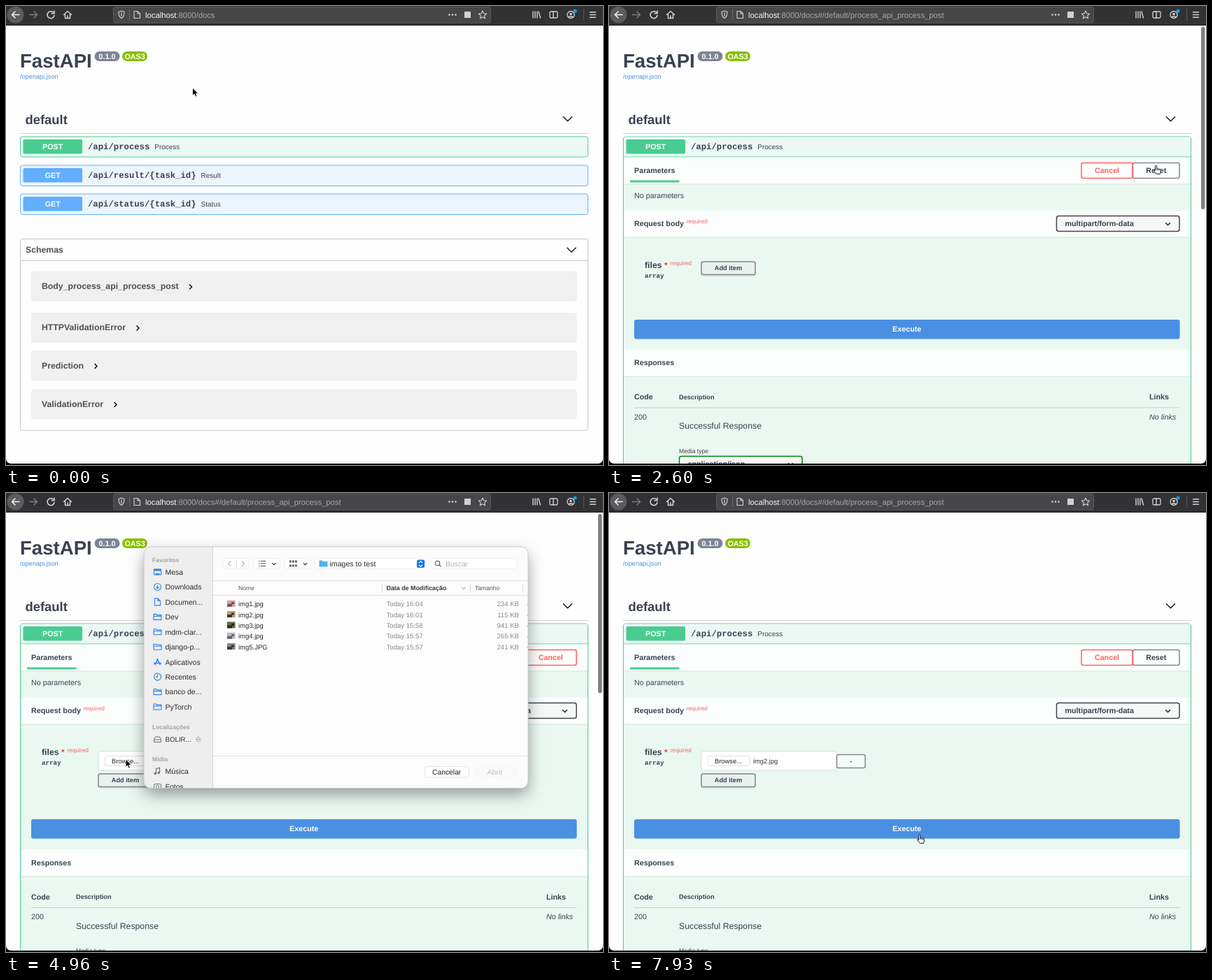
Recreate the animation shown at these times as an HTML page. Size 853 by 657 pixels, loop 8000 ms.

```html
<!DOCTYPE html>
<html lang="en">
<head>
<meta charset="utf-8">
<title>API docs upload</title>
<style>
html, body { margin: 0; width: 100%; height: 100%; overflow: hidden; background: #000; }
svg { display: block; width: 853px; height: 657px; }
text { font-family: "Liberation Sans", Arial, sans-serif; text-rendering: geometricPrecision; white-space: pre; }
.mono { font-family: "Liberation Mono", "Courier New", monospace; }
</style>
</head>
<body>
<svg id="stage" viewBox="0 0 853 657" xmlns="http://www.w3.org/2000/svg"></svg>
<script>
const INK = '#3b4151', GREEN = '#49cc90', BLUE = '#61affe', RED = '#ff6060';
const TINT = '#e9f8f1', BOLD = 'font-weight="700"', MID = 'text-anchor="middle"';
const ICON = '#d2d2d4', MAC = '#2583f0';

const text = (x, y, s, size = 10.74, fill = INK, extra = '') =>
  `<text x="${x}" y="${y}" font-size="${size}" fill="${fill}" ${extra}>${s}</text>`;
const bold = (x, y, s, size, fill, extra = '') => text(x, y, s, size, fill, BOLD + ' ' + extra);
const rect = (x, y, w, h, fill, extra = '') =>
  `<rect x="${x}" y="${y}" width="${w}" height="${h}" fill="${fill}" ${extra}/>`;
const line = (d, stroke, width = 1, extra = '') =>
  `<path d="${d}" fill="none" stroke="${stroke}" stroke-width="${width}" ${extra}/>`;
const disc = (x, y, r, fill, extra = '') => `<circle cx="${x}" cy="${y}" r="${r}" fill="${fill}" ${extra}/>`;
const group = (id, body, extra = '') => `<g id="${id}" ${extra}>${body}</g>`;
const at = (x, y, body) => `<g transform="translate(${x} ${y})">${body}</g>`;
const down = (x, y, w, stroke = '#111', width = 1.4) =>
  line(`M${x - w} ${y - w / 2}l${w} ${w}l${w} ${-w}`, stroke, width);
const right = (x, y) => line(`M${x - 2} ${y - 3.5}l3.5 3.5l-3.5 3.5`, '#111', 1.5);
const outline = (color, width = 1.5, r = 3) => `stroke="${color}" stroke-width="${width}" rx="${r}"`;

function button(x, y, w, h, label, color = INK, border = '#85878d', size = 10.74) {
  return rect(x, y, w, h, 'rgba(255,255,255,.55)', outline(border, 1.5, 2.5)) +
    bold(x + w / 2, y + h / 2 + size * .34, label, size, color, MID);
}

function toolbar() {
  const s = (d, c = ICON, w = 1.4) => line(d, c, w, 'stroke-linecap="round" stroke-linejoin="round"');
  return rect(0, 0, 853, 28, '#323234') + rect(0, 27, 853, 1, '#19191b') +
    disc(13.5, 12.5, 12, '#5c5c5f') + s('M19 12.5H8.5M13 8l-4.5 4.5L13 17', '#f2f2f2', 1.6) +
    s('M33.500 12.500H44M40 8l4.500 4.500L40 17', '#7c7c7f', 1.5) +
    s('M67.500 9A5 5 0 1 0 69 13.500M69 7v3.800h-3.800', ICON, 1.6) +
    s('M82.500 12.500L88 7.500l5.500 5M84.500 12v5.500h7V12M88 17v-3', ICON, 1.5) +
    rect(153.500, 1.500, 539, 22.500, '#474749', outline('#5a5a5c', 1, 2.5)) +
    s('M161 8.500L165 7l4 1.500c0 5-1 7.500-4 9c-3-1.500-4-4-4-9zM165 9.500v5', ICON, 1.2) +
    line('M176.500 5V20', '#6a6a6c') +
    s('M183 7.500h5l3.500 3.500v6.500H183zM188 7.500V11h3.500', ICON, 1.1) +
    text(199, 16.500, '<tspan fill="#f9f9fa">localhost</tspan>:8000/docs<tspan id="hash">#/default/process_api_process_post</tspan>', 11.25, '#a9a9ab') +
    [633.5, 638, 642.5].map(x => disc(x, 12.500, 1.3, ICON)).join('') +
    rect(655, 8, 9, 9, ICON) +
    s('M681 7l1.700 3.700 4 .4-3 2.700.9 4-3.600-2.100-3.600 2.100.9-4-3-2.700 4-.4z', ICON, 1.1) +
    s('M753 8v9M756 8v9M759 8v9M761 8l2.500 9', ICON, 1.4) +
    rect(777, 8, 11, 9, 'none', outline(ICON, 1.3, 1.5)) + s('M782 8v9') +
    disc(807, 12.500, 5, 'none', `stroke="${ICON}" stroke-width="1.3"`) + disc(807, 11.500, 1.8, ICON) +
    s('M804 16q3-2.500 6 0') + disc(813, 7, 2.6, '#0aa0ff') +
    line('M825.500 4V21', '#59595b') + s('M834.500 8.800h8M834.500 12.500h8M834.500 16.200h8');
}

function pageTop() {
  return bold(20, 88, 'FastAPI', 27.6) +
    rect(126.500, 65, 36, 14, '#7d8492', 'rx="7"') + bold(144.500, 75.500, '0.1.0', 10.74, '#fff', MID) +
    rect(166, 65, 36, 14, '#89bf04', 'rx="7"') + bold(184, 75.500, 'OAS3', 10.74, '#fff', MID) +
    text(20, 104, '/openapi.json', 9.2, '#4990e2') +
    bold(27.500, 168.500, 'default', 18.4) + down(802.500, 161.500, 6.5) +
    line('M20 182.500H832', '#cfd1d5');
}

function opHead(y, verb, path, note, color) {
  return rect(24.500, y + 4, 84.500, 20.500, color, 'rx="2"') +
    bold(66.700, y + 17.800, verb, 10.74, '#fff', MID) +
    bold(117, y + 18, path, 12.27, INK, 'class="mono"') +
    text(117 + path.length * 7.36 + 7, y + 17.500, note, 9.97);
}

function getRow(y, path, note) {
  return rect(20.500, y, 811, 29.500, '#ecf5fc', outline(BLUE, 1)) + opHead(y, 'GET', path, note, BLUE);
}

function lower() {
  const models = [[380, 'Body_process_api_process_post', 264], [439, 'HTTPValidationError', 188.5],
    [493.500, 'Prediction', 128.5], [548.500, 'ValidationError', 156.5]];
  return getRow(228, '/api/result/{task_id}', 'Result') + getRow(269, '/api/status/{task_id}', 'Status') +
    rect(20.500, 333.500, 811, 274, '#fefefe', outline('#c4c6c9', 1)) +
    line('M20.500 364.500H831.500', '#c4c6c9') +
    bold(28, 352.500, 'Schemas', 12.27, '#505050') + down(808, 349, 6.5) +
    models.map(([y, name, x]) => rect(36, y, 779.500, 43, '#f0f0f0', 'rx="3"') +
      bold(51, y + 25.300, name, 12.27, '#505050') + right(x, y + 22)).join('');
}

function select(x, y, w, label, border) {
  return rect(x, y, w, 22, '#f6f8f7', outline(border)) + bold(x + 12, y + 14.500, label) +
    down(x + w - 16.500, y + 11.500, 3.4, '#222', 1.5);
}

const band = (y, h) => rect(21, y, 810, h, '#fbfefd') + line(`M21 ${y + h + .5}H831`, '#d9e6e0');

function expanded() {
  return rect(20.500, 187, 811, 700, TINT, outline(GREEN, 1)) +
    rect(21, 187.500, 810, 28.500, '#ecf8f4') + line('M20.500 216H831.500', GREEN) +
    opHead(187, 'POST', '/api/process', 'Process', GREEN) +
    band(216.500, 38) + bold(36, 238.500, 'Parameters') + rect(30, 249.500, 70.500, 3, GREEN) +
    text(36, 274.500, 'No parameters') +
    band(292.500, 38) + bold(36, 314.800, 'Request body') + text(110.500, 310.500, 'required', 8.3, RED) +
    select(639.500, 300.500, 175.500, 'multipart/form-data', '#41444e') +
    bold(51, 374.800, 'files', 12.27) + bold(79, 375, '*', 12, '#f33') +
    text(87.500, 370.500, 'required', 8.3, RED) + bold(51, 389, 'array', 9.2, INK, 'class="mono"') +
    group('tryIt', button(732.500, 224.500, 82.500, 22, 'Try it out')) +
    group('cancelReset', button(748.500, 224.500, 66.500, 22, 'Reset') + button(675, 224.500, 73, 22, 'Cancel', RED, RED)) +
    group('cancelOnly', button(741.500, 224.500, 73.500, 22, 'Cancel', RED, RED)) +
    group('fileRow', rect(132, 369.500, 193, 27.500, '#fff', outline('#d9dddc', 1)) +
      rect(141, 376.500, 60, 14, '#fff', outline('#e2e2e2', 1)) + text(151, 386.500, 'Browse...', 9.35, '#222') +
      text(206, 386.500, '<tspan id="fileName"></tspan>', 9.35, '#333') + button(325.500, 374.500, 40.500, 19, '-', INK, '#85878d', 9.2)) +
    group('addItem', rect(131, 365.500, 79, 21.500, 'rgba(0,0,0,.1)', 'rx="4"') + button(132, 366, 77, 18.500, 'Add item', INK, '#85878d', 9.2)) +
    group('execute', rect(36, 449, 779.500, 28.300, 'rgba(0,0,0,.12)', 'rx="3"') +
      rect(36, 449, 779.500, 27.500, '#4990e2', 'rx="3"') + bold(425.700, 466, 'Execute', 10.74, '#fff', MID)) +
    group('responses', band(464, 38.500) + bold(36, 486.700, 'Responses') +
      bold(36, 535.700, 'Code') + bold(100, 535.200, 'Description', 9.2) + bold(772, 535.700, 'Links') +
      line('M36 547.500H815.500', '#c3d3cc') + text(36, 564.300, '200') +
      text(100, 577.800, 'Successful Response', 12.27) + text(772, 564.300, 'No links', 10.74, INK, 'font-style="italic"') +
      text(100, 612.300, 'Media type', 8.6) + select(100.500, 617, 175.500, 'application/json', 'green') +
      text(100, 649.300, 'Controls <tspan class="mono">Accept</tspan> header.', 8.6, 'green'));
}

function sideIcon(kind) {
  const s = d => line(d, MAC, 1.1, 'stroke-linejoin="round" stroke-linecap="round"');
  return {
    desk: s('M-5-4h10v8h-10z') + rect(-5, -4, 10, 2.5, MAC) + rect(-3, 2, 6, 2, MAC),
    load: disc(0, 0, 5, 'none', `stroke="${MAC}" stroke-width="1.1"`) + s('M0-2.500V2.500M-2 .5L0 2.500L2 .5'),
    doc: s('M-4-5h4.500l3.500 3.500V5h-8zM.5-5v3.500H4'),
    dir: s('M-5.500-4h3.500l1.200 1.300h6.300V4h-11zM-5.500-1h11'),
    app: line('M-4 4.500L.5-4.500M-1-4.500L4 4.500M-5.500 1.800h11', MAC, 1.4),
    clock: disc(0, 0, 5, 'none', `stroke="${MAC}" stroke-width="1.1"`) + s('M0-3V0H-2.500')
  }[kind];
}

function dialog() {
  const grey = '#8a8a8c';
  const places = [['desk', 'Mesa'], ['load', 'Downloads'], ['doc', 'Documen...'], ['dir', 'Dev'], ['dir', 'mdm-clar...'],
    ['dir', 'django-p...'], ['app', 'Aplicativos'], ['clock', 'Recentes'], ['dir', 'banco de...'], ['dir', 'PyTorch']];
  const files = [['img1.jpg', '16:04', 234, '#c9a59c', '#7d4f48'], ['img2.jpg', '16:01', 115, '#b79c7c', '#3d342c'],
    ['img3.jpg', '15:58', 941, '#5d6a3d', '#26261c'], ['img4.jpg', '15:57', 265, '#b9bcc0', '#5e646a'],
    ['img5.JPG', '15:57', 241, '#80858a', '#33373a']];
  const side = rect(197, 77, 98, 346, '#eeeeee') +
    bold(209, 99, 'Favoritos', 8.5, '#a3a3a5') +
    places.map(([kind, name], i) => at(216.500, 113 + 21.45 * i, sideIcon(kind)) +
      text(227.500, 116.800 + 21.45 * i, name, 10.5, '#2d2d2f')).join('') +
    bold(209, 338.200, 'Localizações', 8.6, '#a3a3a5') +
    line('M211.500 353l2-4h6l2 4v3.500h-10zM211.500 353h10', '#6e6e70', 1, 'stroke-linejoin="round"') +
    text(227.500, 356, 'BOLIR...', 9.7, '#2d2d2f') +
    line('M271.500 352.500l3.300-4 3.300 4zM271.500 355h6.600', '#a0a0a2') +
    bold(209, 384.300, 'Mídia', 8.6, '#a3a3a5') +
    line('M214.500 401.500v-7l5-1.200v7', '#6e6e70', 1.2) + disc(213.200, 401.500, 1.7, '#6e6e70') + disc(218.200, 400.500, 1.7, '#6e6e70') +
    text(227.500, 402, 'Música', 10.5, '#2d2d2f') +
    rect(211.500, 416.500, 10, 8, 'none', outline('#6e6e70', 1, 1.5)) + disc(216.500, 420.500, 2, 'none', 'stroke="#6e6e70"') +
    text(227.500, 423.500, 'Fotos', 10.5, '#2d2d2f');
  const pill = (x, w) => rect(x, 93.500, w, 15, '#fff', outline('#efefef', 1, 4));
  const list = [97.500, 101, 104.500].map(y => line(`M361 ${y}h1.500M364 ${y}h7`, '#444', 1.2)).join('');
  const grid = [405, 409, 413].map(x => rect(x, 96.500, 2.7, 3, '#555') + rect(x, 102.500, 2.7, 3, '#555')).join('');
  const bar = pill(310, 37) + line('M321 97.500l-3.500 3.500 3.500 3.500M337 97.500l3.500 3.500-3.500 3.500', '#b8b8ba', 1.2) + line('M329.500 95v12', '#ddd') +
    pill(353.500, 38) + list + down(383, 101.500, 2.6, '#444', 1.3) +
    pill(398, 37) + grid + down(427.500, 101.500, 2.6, '#444', 1.3) +
    pill(441.500, 157) + `<path d="M447.500 96.500h4l1.300 1.400h6.700v7.600h-12z" fill="#4db2ee"/>` +
    text(462.500, 104.700, 'images to test', 10.6, '#2d2d2f') + rect(587, 95.500, 11, 11.500, '#1278f2', 'rx="2.5"') +
    line('M590 100l2.500-2.500L595 100M590 102.800l2.500 2.500 2.500-2.500', '#fff', 1.2) +
    pill(607, 123) + disc(616.500, 100.500, 3.2, 'none', 'stroke="#555" stroke-width="1.1"') + line('M619 103l2.700 2.700', '#555', 1.2) +
    text(628, 104.700, 'Buscar', 10.3, '#b0b0b2');
  const heads = line('M296 125.500H746M296 146.500H746M296 376.500H746', '#e1e1e1') +
    line('M537.500 130v13M663.500 130v13M738.500 130v13', '#d8d8d8') +
    text(332, 139, 'Nome', 8.6, '#555') + bold(543.500, 139, 'Data de Modificação', 8.9, '#3a3a3c') +
    down(654, 136.200, 3, '#888', 1) + text(670, 139, 'Tamanho', 8.6, '#555');
  const rows = files.map(([name, time, size, light, dark], i) => {
    const y = 162.200 + 15.35 * i, id = i === 1 ? 'picked' : '';
    return `<g ${id && 'id="' + id + '"'} fill="${grey}">` + rect(316, y - 8.500, 11.500, 9, light) +
      rect(316, y - 3.500, 7, 4, dark) + rect(322, y - 6, 4, 3, dark) +
      text(332, y, name, 9.5, '#2d2d2f') + text(543.500, y, 'Today ' + time, 9.6, grey) +
      text(733, y, size + ' KB', 9.6, grey, 'text-anchor="end"') + rect(744.500, y - 3, 1.2, 1.2, grey) + '</g>';
  }).join('');
  const foot = rect(598.500, 391.500, 63, 15.500, '#fff', outline('#e4e4e4', 1, 4)) + text(629.700, 402.800, 'Cancelar', 10.3, '#222', MID) +
    `<rect id="openBox" x="667.500" y="391.500" width="62.500" height="15.500" rx="4"/>` +
    `<text id="openLabel" x="698.700" y="402.800" font-size="10.600" ${MID}>Abrir</text>`;
  return rect(197, 77, 549, 345.500, '#fcfcfc', 'rx="10" filter="url(#shade)"') +
    `<g clip-path="url(#sheet)">` + side + line('M295.500 77V423', '#d6d6d6') + bar + heads +
    rect(296, 166.500, 450, 15, '#0a5cd8', 'id="pick"') + rows + foot + '</g>' +
    rect(197, 77, 549, 345.500, 'none', outline('#c2c2c2', .8, 10));
}

const stage = document.getElementById('stage');
stage.innerHTML = `<defs>
  <clipPath id="win"><rect x="0" y="-12" width="853" height="667" rx="7"/></clipPath>
  <clipPath id="sheet"><rect x="197" y="77" width="549" height="345.500" rx="10"/></clipPath>
  <filter id="shade" x="-20%" y="-20%" width="140%" height="145%"><feDropShadow dx="0" dy="9" stdDeviation="11" flood-opacity=".38"/></filter>
  </defs><g clip-path="url(#win)">` +
  rect(0, 0, 853, 657, '#fefefe') + pageTop() +
  group('lower', lower()) +
  group('short', `<rect id="postBox" x="20.500" y="187" width="811" fill="#ecf8f4" ${outline(GREEN, 1)}/>` +
    opHead(187, 'POST', '/api/process', 'Process', GREEN)) +
  group('loading', line('M20.500 216H831.500', GREEN) +
    at(425.700, 265.300, line('M-7.800-4.500A9 9 0 1 0 3-8.500', '#50565a', 2.5))) +
  group('expanded', expanded()) +
  group('scroll', `<rect id="thumb" x="846" y="30" width="5.500" rx="2.700" fill="#808080"/>`) +
  group('dialog', dialog()) + toolbar() + '</g>' +
  group('arrow', `<path d="M0 0V11.300L2.600 9L4.400 13L6.400 12.200L4.700 8.300H8.200Z" fill="#000" stroke="#fff" stroke-width=".9"/>`) +
  group('hand', `<path d="M2.500 7.500V1.300a1.100 1.100 0 0 1 2.200 0V5q1-.6 1.900.3q1-.6 1.900.3q1.600-.4 1.800 1.200V9q0 1.600-1 3.300H4.200Q2 9.800.5 7.800Q0 6.600 1.200 6.500Q2 6.600 2.500 7.500Z" fill="#fff" stroke="#111" stroke-width="1"/>` +
    line('M4.700 5v2.500M6.600 5.300v2.200M8.500 5.600v2', '#111', .7));

const el = {};
stage.querySelectorAll('[id]').forEach(n => el[n.id] = n);
const show = (id, on) => el[id].setAttribute('display', on ? 'inline' : 'none');
const move = (id, x, y) => el[id].setAttribute('transform', `translate(${x} ${y})`);

const LOOP = 8000, TICK = 118.3;
const LOAD = 10, OPEN = 11, TRY = 22, ADD = 31, SHEET = 42, PICK = 56, CLOSE = 60;
const pointer = [
  [1, 266.5, 117], [3, 252, 147], [5, 226, 197], [6, 220.5, 208.5], [7, 220.5, 208.5], [8, 220, 204.5], [13, 220, 204.5],
  [14, 240, 225], [15, 425, 258], [16, 672, 260], [17, 778, 226], [19, 781, 228], [22, 778, 228],
  [24, 700, 262], [26, 420, 346], [28, 215, 378], [30, 186, 376], [32, 197, 374], [34, 207, 384], [36, 202, 376],
  [38, 182, 372], [40, 171, 381], [42, 171, 381], [43, 176, 372], [45, 270, 290], [47, 352, 230],
  [49, 332, 194], [51, 326, 160], [53, 348, 164], [55, 343, 174], [58, 342, 172],
  [60, 343, 175], [63, 385, 320], [65, 431, 470], [66, 438, 486], [67, 440, 489]
];
const overLink = [[6, 13], [17, 23], [29, 30], [65, 67]];

function pointerAt(k) {
  const i = pointer.findIndex(p => p[0] >= k);
  if (i <= 0) return pointer[0].slice(1);
  const [a, ax, ay] = pointer[i - 1], [b, bx, by] = pointer[i], u = (k - a) / (b - a);
  return [ax + (bx - ax) * u, ay + (by - ay) * u];
}

function draw(ms) {
  const k = Math.floor((ms + 10) / TICK);
  const loading = k === LOAD, open = k >= OPEN, trying = k >= TRY, added = k >= ADD;
  const sheet = k >= SHEET && k < CLOSE, picked = k >= PICK, done = k >= CLOSE;

  show('hash', k >= LOAD);
  show('lower', !open);
  show('short', !open);
  show('loading', loading);
  show('expanded', open);
  move('lower', 0, loading ? 129.5 : 0);
  el.postBox.setAttribute('height', loading ? 158.5 : 29);

  show('tryIt', !trying);
  show('cancelReset', trying && !added || done);
  show('cancelOnly', added && !done);
  show('addItem', trying);
  show('fileRow', added);
  show('execute', trying);
  move('addItem', 0, added ? 36 : 0);
  move('execute', 0, added ? 18 : 0);
  move('responses', 0, added ? 46 : trying ? 27.5 : 0);
  el.fileName.textContent = done ? 'img2.jpg' : 'No file selected.';

  el.thumb.setAttribute('height', loading ? 528 : added ? 256.5 : trying ? 261 : 266);
  el.scroll.setAttribute('opacity', k < LOAD ? 0 : Math.max(0, Math.min(1, (45 - k) / 3)));

  show('dialog', sheet);
  show('pick', picked);
  el.picked.querySelectorAll('text').forEach((t, i) =>
    t.setAttribute('fill', picked ? '#fff' : i ? '#8a8a8c' : '#2d2d2f'));
  el.openBox.setAttribute('fill', picked ? '#0a7aff' : '#f9f9f9');
  el.openLabel.setAttribute('fill', picked ? '#fff' : '#bdbdbf');

  const hand = overLink.some(([a, b]) => k >= a && k <= b);
  const [x, y] = pointerAt(k);
  show('hand', hand);
  show('arrow', !hand);
  move('hand', x, y);
  move('arrow', x, y);
}

const start = performance.now();
function loop() {
  draw((performance.now() - start) % LOOP);
  requestAnimationFrame(loop);
}
loop();
</script>
</body>
</html>
```
